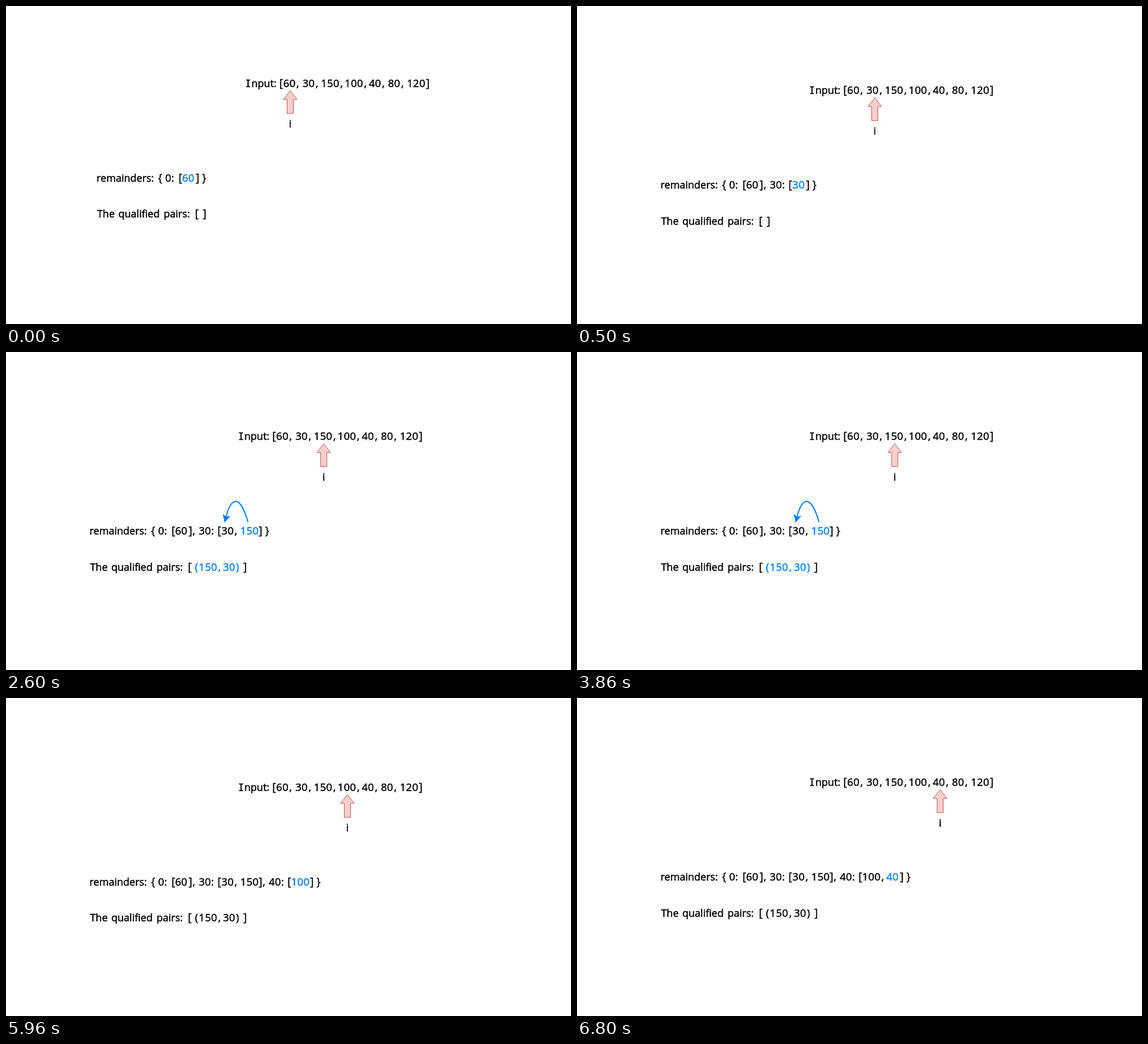
An HTML page for the animation above (8 s loop, 998 by 561 pixels).

```html
<!DOCTYPE html>
<html lang="en">
<head>
<meta charset="utf-8">
<title>Pairs by remainder</title>
<style>
  html, body { margin: 0; width: 100%; height: 100%; overflow: hidden; background: #fff; }
  svg { display: block; width: 100%; height: 100%; }
  text {
    font: 400 18px "Open Sans", "Noto Sans", sans-serif; font-variant-ligatures: none;
    fill: #000; stroke: #000; stroke-width: .5px; stroke-linejoin: round;
  }
  .num { font-size: 18.5px; letter-spacing: .3px; }
  .bracket { font-size: 20px; stroke-width: .3px; }
  .serif { font-family: "Noto Sans Mono", "DejaVu Sans Mono", monospace; }
  .new { fill: #007fff; stroke: #007fff; }
  .mid { text-anchor: middle; }
</style>
</head>
<body>
<svg id="stage" viewBox="0 0 998 561"></svg>
<script>
const NS = "http://www.w3.org/2000/svg";
const LOOP = 8000;
const BLUE = "#007fff";
const stage = document.getElementById("stage");

function add(parent, tag, attrs, text) {
  const el = document.createElementNS(NS, tag);
  for (const key in attrs) el.setAttribute(key, attrs[key]);
  if (text) el.textContent = text;
  parent.appendChild(el);
  return el;
}

function styleOf(text) {
  if (/^[\[\]{}]$/.test(text)) return "bracket";
  if (/^\d/.test(text)) return "num";
  return text === "I" ? "serif" : "";
}

// Each word is [x, text, isNew]; a comma after a number stands slightly apart.
function line(parent, y, words) {
  for (const [x, text, isNew] of words) {
    const [, body, comma] = text.match(/^(.+?)(,?)$/);
    const el = add(parent, "text", { x, y, class: styleOf(text) + (isNew ? " new" : "") }, body);
    if (comma) add(el, "tspan", { dx: 1.5 }, comma);
  }
}

const input = [
  [409.7, "I"], [421, "nput:"], [470.3, "["], [477.3, "60,"], [511.2, "30,"], [543.8, "150,"],
  [585.8, "100,"], [628.4, "40,"], [662.2, "80,"], [695.7, "120"], [729.3, "]"]
];

const close = x => [[x, "]"], [x + 11.2, "}"]];
const next = (x, key, open) => [[x, "]"], [x + 7.3, ","], [x + 17.9, key], [open, "["]];

const head = [[147.6, "remainders:"], [256, "{"], [268.7, "0:"], [292.2, "["]];
const zero = [...head, [298.7, "60"], ...next(322.5, "30:", 373.5)];
const thirty = [...zero, [380.6, "30,"], [413.8, "150"], ...next(446.3, "40:", 497)];

const label = [[148.4, "The"], [186, "qualified"], [266, "pairs:"], [321.3, "["]];
const noPairs = [...label, [335, "]"]];
const onePair = isNew => [
  ...label, [333.8, "(", isNew], [340.5, "150,", isNew], [383.2, "30", isNew], [406.3, ")", isNew], [419, "]"]
];

const steps = [
  { at: 0, dx: 12.5, dy: -12.5, arrow: 489.5, pairs: noPairs,
    map: [...head, [298.7, "60", true], ...close(322.5)] },
  { at: 500, dx: 0, dy: 0, arrow: 526, pairs: noPairs,
    map: [...zero, [380.6, "30", true], ...close(404.5)] },
  { at: 2600, dx: 0, dy: 0, arrow: 561.3, pairs: onePair(true), link: true,
    map: [...zero, [380.6, "30,"], [413.8, "150", true], ...close(446.3)] },
  { at: 4700, dx: 0, dy: 8.5, arrow: 603, pairs: onePair(false),
    map: [...thirty, [503.7, "100", true], ...close(537)] },
  { at: 6800, dx: 0, dy: 0, arrow: 641.5, pairs: onePair(false),
    map: [...thirty, [503.7, "100,"], [546.4, "40", true], ...close(570.5)] }
];

function build(step) {
  const g = add(stage, "g", { transform: `translate(${step.dx} ${step.dy})` });
  line(g, 155.3, input);
  add(g, "path", {
    d: `M${step.arrow} 161.8l12 15.4h-6.5v25h-11v-25h-6.5z`,
    fill: "#f8cecc", stroke: "#b85450", "stroke-linejoin": "miter"
  });
  add(g, "text", { x: step.arrow, y: 226.7, class: "mid" }, "i");
  line(g, 322, step.map);
  line(g, 385.5, step.pairs);
  if (step.link) {
    add(g, "path", {
      d: "M427.5 300C421 277 413 263.5 405.5 263.5S392 277 388.6 291",
      fill: "none", stroke: BLUE, "stroke-width": 2
    });
    add(g, "path", {
      d: "M386.5 299.5L383.9 287.4L388.6 291.3L394.6 290.2Z",
      fill: BLUE, stroke: BLUE, "stroke-width": 1.4
    });
  }
  return g;
}

const scenes = steps.map(build);
const start = performance.now();

function draw() {
  const t = (performance.now() - start) % LOOP;
  const current = steps.filter(s => s.at <= t).length - 1;
  scenes.forEach((g, i) => g.setAttribute("display", i === current ? "inline" : "none"));
  requestAnimationFrame(draw);
}
draw();
</script>
</body>
</html>
```
